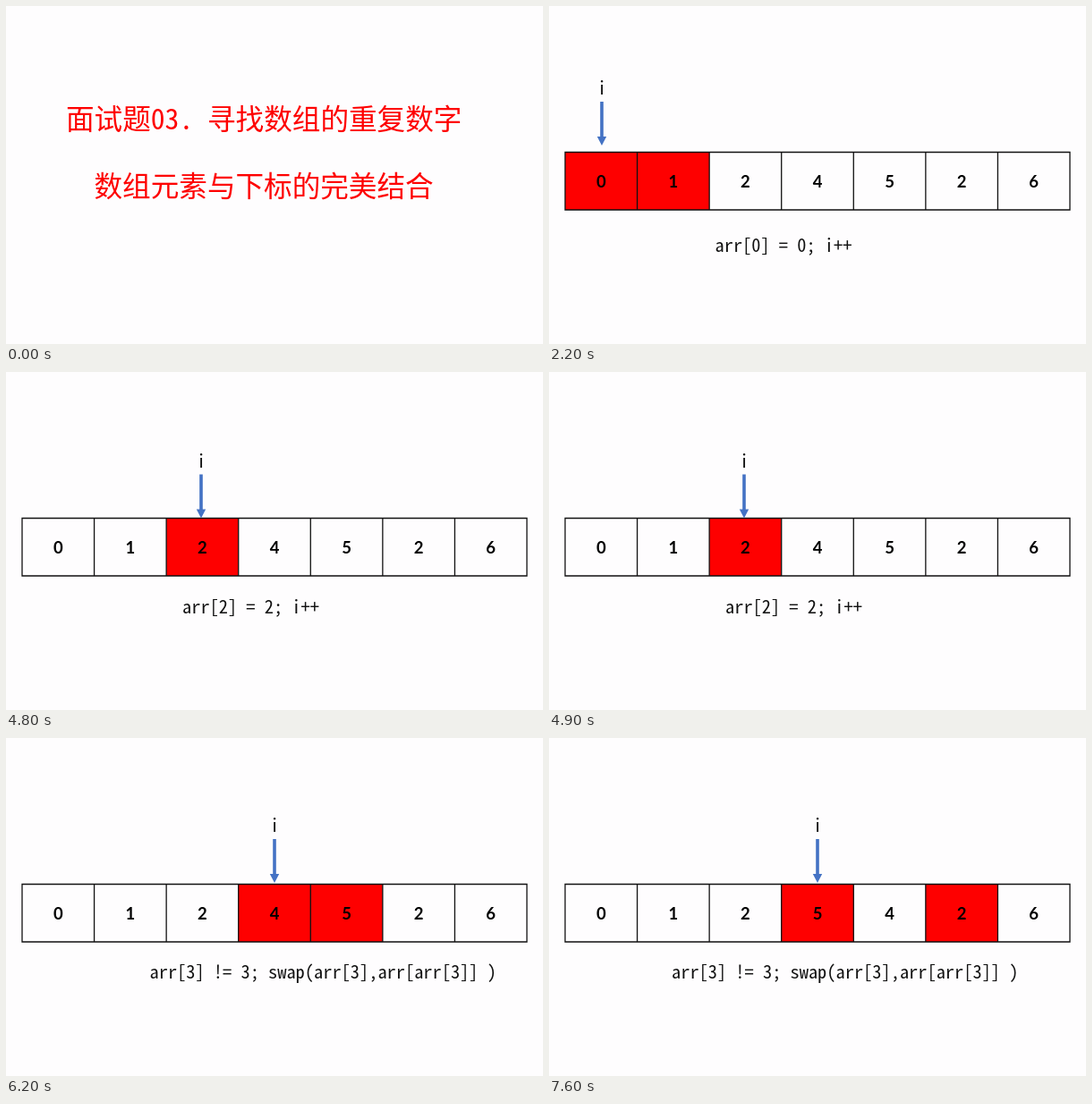
An HTML page for the animation above (8 s loop, 600 by 378 pixels).

```html
<!DOCTYPE html>
<html lang="zh-CN">
<head>
<meta charset="utf-8">
<title>数组元素与下标</title>
<style>
  html, body { margin: 0; width: 100%; height: 100%; overflow: hidden; background: #fefdfe; }
  svg { display: block; width: 600px; height: 378px; }
  .title { font: 31.6px "Noto Sans Mono CJK SC", "Noto Sans CJK SC", "Noto Sans CJK", sans-serif; fill: #fe0000; }
  .code { font-family: "Noto Sans Mono CJK SC", "Noto Sans Mono", monospace; font-size: 20.4px; fill: #111; white-space: pre; }
  .digit { font: bold 18.5px Lato, "Open Sans", sans-serif; text-anchor: middle; }
  .grid { fill: none; stroke: #111; stroke-width: 1.3; }
  .arrow { fill: #4472c4; }
  .hot { fill: #fe0000; }

  .scene { visibility: hidden; animation: 8s step-end infinite; }
  #s0 { animation-name: show0; }
  #s1 { animation-name: show1; }
  #s2 { animation-name: show2; }
  #s3 { animation-name: show3; }
  #s4 { animation-name: show4; }
  #s5 { animation-name: show5; }
  #s6 { animation-name: show6; }
  @keyframes show0 { 0% { visibility: visible } 6.25%, 100% { visibility: hidden } }
  @keyframes show1 { 0% { visibility: hidden } 6.25% { visibility: visible } 26.25%, 100% { visibility: hidden } }
  @keyframes show2 { 0% { visibility: hidden } 26.25% { visibility: visible } 43.75%, 100% { visibility: hidden } }
  @keyframes show3 { 0% { visibility: hidden } 43.75% { visibility: visible } 60%, 100% { visibility: hidden } }
  @keyframes show4 { 0% { visibility: hidden } 60% { visibility: visible } 76.25%, 100% { visibility: hidden } }
  @keyframes show5 { 0% { visibility: hidden } 76.25% { visibility: visible } 93.75%, 100% { visibility: hidden } }
  @keyframes show6 { 0% { visibility: hidden } 93.75%, 100% { visibility: visible } }
</style>
</head>
<body>
<svg id="stage" viewBox="0 0 600 378">
  <g id="s0" class="scene title">
    <text x="67" y="137.5">面试题03.</text>
    <text x="225" y="137.5">寻找数组的重复数字</text>
    <text x="98.5" y="212.5">数组元素与下标的完美结合</text>
  </g>
</svg>
<script>
  const LEFT = 18, TOP = 163.5, CELL = 564 / 7, HEIGHT = 64.5;
  const CODE_ADVANCE = 10.2;

  const scenes = [
    { values: '1024526', hot: [0, 1], arrow: [59, 156], text: [128, 273, 'arr[0] != 0, swap(arr[0], arr[arr[0]])'] },
    { values: '0124526', hot: [0, 1], arrow: [59, 156], text: [185.5, 275, 'arr[0] = 0; i++'] },
    { values: '0124526', hot: [1], arrow: [137, 161], text: [197, 270, 'arr[1] = 1; i++'] },
    { values: '0124526', hot: [2], arrow: [218, 163.5], text: [197, 270, 'arr[2] = 2; i++'] },
    { values: '0124526', hot: [3, 4], arrow: [300, 162], text: [160.5, 269, 'arr[3] != 3; swap(arr[3],arr[arr[3]] )'] },
    { values: '0125426', hot: [3, 5], arrow: [300, 162], text: [137, 269, 'arr[3] != 3; swap(arr[3],arr[arr[3]] )'] }
  ];

  function add(parent, tag, attrs, text = '') {
    const node = document.createElementNS('http://www.w3.org/2000/svg', tag);
    for (const key in attrs) node.setAttribute(key, attrs[key]);
    node.textContent = text;
    return parent.appendChild(node);
  }

  function drawRow(group, values, hot) {
    for (const i of hot) {
      add(group, 'rect', { class: 'hot', x: LEFT + i * CELL, y: TOP, width: CELL, height: HEIGHT });
    }
    let lines = `M${LEFT} ${TOP}h564v${HEIGHT}h-564z`;
    for (let i = 1; i < 7; i++) lines += `M${LEFT + i * CELL} ${TOP}v${HEIGHT}`;
    add(group, 'path', { class: 'grid', d: lines });
    [...values].forEach((value, i) =>
      add(group, 'text', { class: 'digit', x: LEFT + (i + 0.5) * CELL, y: 203 }, value));
  }

  function drawPointer(group, x, tip) {
    add(group, 'text', { class: 'code', x, y: tip - 57, 'text-anchor': 'middle' }, 'i');
    add(group, 'path', {
      class: 'arrow',
      d: `M${x - 1.8} ${tip - 49}h3.6v39h3.4l-5.2 10l-5.2 -10h3.4z`
    });
  }

  const stage = document.getElementById('stage');
  scenes.forEach(({ values, hot, arrow, text: [x, y, code] }, i) => {
    const group = add(stage, 'g', { id: 's' + (i + 1), class: 'scene' });
    drawRow(group, values, hot);
    drawPointer(group, ...arrow);
    add(group, 'text', { class: 'code', x, y }, code);
  });

  // Choose the font size that gives the wanted character advance.
  const labels = document.querySelectorAll('.code');
  const pen = document.createElement('canvas').getContext('2d');
  pen.font = '100px ' + getComputedStyle(labels[0]).fontFamily;
  const size = CODE_ADVANCE * 100 / pen.measureText('0').width;
  labels.forEach(label => { label.style.fontSize = size + 'px'; });
</script>
</body>
</html>
```
